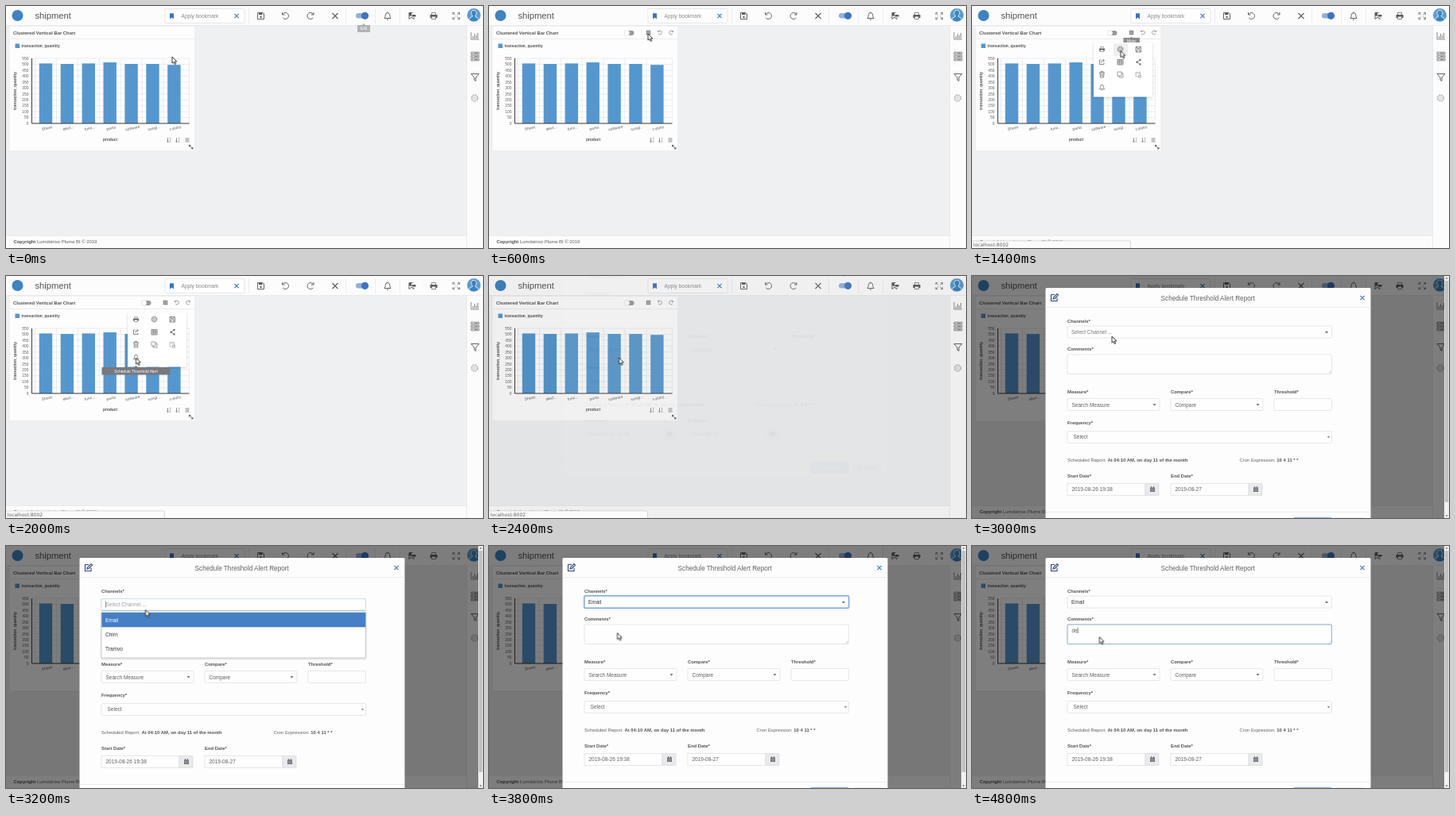
An HTML page for the animation above (5000 ms loop, 600 by 305 pixels).

```html
<!DOCTYPE html>
<html lang="en">
<head>
<meta charset="utf-8">
<title>Threshold alert scheduling</title>
<style>
html, body { margin: 0; width: 100%; height: 100%; overflow: hidden; background: #eff0f1; }
svg { display: block; width: 100%; height: 100%; font-family: "Liberation Sans", Arial, sans-serif; }
text { fill: #606060; font-size: 6.5px; }
.b { font-weight: bold; font-size: 5.9px; fill: #525252; }
.s { font-size: 4.9px; }
.note { font-size: 5.9px; }
.mid { text-anchor: middle; }
.end { text-anchor: end; }
.white { fill: #fff; }
.line { fill: none; stroke: #5c5c5c; stroke-width: .95; }
.thin { fill: none; stroke: #666; stroke-width: .75; }
.solid { fill: #5c5c5c; }
.field { fill: #fefefe; stroke: #dfe1e4; stroke-width: .8; }
.rule { fill: none; stroke: #e4e5e7; stroke-width: .7; }

/* One loop is 5 s, so 4% is 200 ms. */
.a { animation: 5s step-end infinite; }
.cursor { animation-name: cursor; }
.edit-tip { animation-name: edit-tip; }
.tools { animation-name: tools; }
.more-tip { animation-name: more-tip; }
.menu { animation-name: menu; }
.gear-hover { animation-name: gear-hover; }
.alert-tip { animation-name: alert-tip; }
.status { animation-name: status; }
.backdrop { animation-name: backdrop; }
.modal { animation-name: modal; }
.scrollbar { animation-name: scrollbar; }
.unset { animation-name: unset-value; }
.open { animation-name: open; }
.chosen { animation-name: chosen; }
.glow { animation-name: glow; }
.below { animation-name: below; }
.writing { animation-name: writing; }
.caret { animation-name: caret; }
.key1 { animation-name: key1; }
.key2 { animation-name: key2; }

@keyframes cursor {
  0% { transform: translate(209px, 64px); }
  4% { transform: translate(206px, 52px); }
  8% { transform: translate(203px, 43px); }
  12% { transform: translate(200px, 35px); }
  20% { transform: translate(200.5px, 34.5px); }
  28% { transform: translate(187px, 56.5px); }
  32% { transform: translate(182px, 98px); }
  36%, 48% { transform: translate(163.5px, 103px); }
  52% { transform: translate(180.5px, 92.5px); }
  56% { transform: translate(179px, 81px); }
  60% { transform: translate(176px, 76px); }
  64% { transform: translate(175.5px, 80.5px); }
  68% { transform: translate(174px, 86px); }
  72% { transform: translate(169px, 90px); }
  76% { transform: translate(161.5px, 109.5px); }
  80% { transform: translate(160.5px, 112px); }
  84%, 100% { transform: translate(160.2px, 114.5px); }
}
@keyframes edit-tip { 0% { opacity: 1; } 4%, 100% { opacity: 0; } }
@keyframes tools { 0% { opacity: 0; } 4%, 100% { opacity: 1; } }
@keyframes more-tip { 0% { opacity: 0; } 20% { opacity: 1; } 32%, 100% { opacity: 0; } }
@keyframes menu { 0% { opacity: 0; } 24% { opacity: 1; } 44%, 100% { opacity: 0; } }
@keyframes gear-hover { 0% { opacity: 0; } 28% { opacity: 1; } 32%, 100% { opacity: 0; } }
@keyframes alert-tip { 0% { opacity: 0; } 40% { opacity: 1; } 44%, 100% { opacity: 0; } }
@keyframes status { 0% { opacity: 0; } 24% { opacity: 1; } 60%, 100% { opacity: 0; } }
@keyframes backdrop { 0% { opacity: 0; } 48% { opacity: .05; } 52%, 100% { opacity: .5; } }
@keyframes modal {
  0% { opacity: 0; transform: translateY(-70px); }
  48% { opacity: .07; transform: translateY(-70px); }
  52% { opacity: 1; transform: translateY(-8px); }
  56%, 100% { opacity: 1; transform: none; }
}
@keyframes scrollbar { 0% { opacity: 0; } 52%, 100% { opacity: 1; } }
@keyframes unset-value { 0% { opacity: 1; } 64%, 100% { opacity: 0; } }
@keyframes open { 0% { opacity: 0; } 64% { opacity: 1; } 76%, 100% { opacity: 0; } }
@keyframes chosen { 0% { opacity: 0; } 76%, 100% { opacity: 1; } }
@keyframes glow { 0% { opacity: 0; } 76% { opacity: 1; } 80%, 100% { opacity: 0; } }
@keyframes below { 0% { transform: none; } 64% { transform: translateY(3px); } 76%, 100% { transform: none; } }
@keyframes writing { 0% { opacity: 0; } 80% { opacity: .7; } 84%, 100% { opacity: 1; } }
@keyframes caret {
  0% { opacity: 0; transform: none; }
  80% { opacity: 1; transform: none; }
  92% { opacity: 1; transform: translateX(3.7px); }
  96%, 100% { opacity: 1; transform: translateX(7.3px); }
}
@keyframes key1 { 0% { opacity: 0; } 92%, 100% { opacity: 1; } }
@keyframes key2 { 0% { opacity: 0; } 96%, 100% { opacity: 1; } }
</style>
</head>
<body>
<svg viewBox="0 0 600 305" preserveAspectRatio="none">
  <defs>
    <!-- Icons are centred on 0,0 -->
    <g id="print">
      <path class="solid" d="M-4.500-1.500h9v4h-2v-1.500h-5v1.500h-2z"/>
      <path class="thin" d="M-2.500-1.500v-2.500h5v2.500M-2.500 1.500v2.500h5v-2.500"/>
    </g>
    <g id="bell">
      <path class="line" d="M-4 3Q-2.700 1.500-2.700-1.200Q-2.500-4 0-4Q2.500-4 2.700-1.200Q2.700 1.500 4 3z"/>
      <path class="line" d="M-1 4.600h2M0-5v1"/>
    </g>
    <g id="gear">
      <circle class="line" r="4.300" stroke-dasharray="2.200 1.180"/>
      <circle class="thin" r="3.500"/><circle class="thin" r="1.500"/>
    </g>
    <g id="turn"><path class="line" d="M-3.600-1.800A4 4 0 1 1-3.300 2.300M-4-4.500v3h3"/></g>
    <path id="cross" d="M-3.500-3.500L3.500 3.500M3.500-3.500L-3.500 3.500"/>
    <g id="grid"><path class="solid" d="M-3.500-3.500h7v7h-7z"/><path d="M-1.200-3.500v7M1.200-3.500v7M-3.500-1.200h7M-3.500 1.200h7" stroke="#fff" stroke-width=".6"/></g>
    <g id="rack"><path class="thin" d="M-5-1.300h10v2.600h-10z" fill="#aaa"/><path class="thin" d="M-3.500 0h1M-1 0h4.500"/></g>
    <path id="caretdown" class="solid" d="M-2-1h4l-2 2.200z"/>
    <g id="date">
      <path d="M0-7.500h17v15H0z" fill="#e9eaed" stroke="#d8dade" stroke-width=".7"/>
      <path class="solid" d="M6-2.500h6v5.500h-6zM7-3.700h1v1h-1zM10-3.700h1v1h-1z"/>
      <path d="M6-1h6M6 1h6M8-1v4M10-1v4" stroke="#e9eaed" stroke-width=".4"/>
    </g>
    <g id="sort"><path class="thin" d="M-1.500-2.700v5.400M-2.700 1.500l1.200 1.300 1.200-1.300M.8-2.300h1.500M.8 0h1.500M.8 2.300h1.500"/></g>
    <filter id="soft" x="-10%" y="-10%" width="120%" height="120%"><feDropShadow dx="0" dy="1" stdDeviation="1.300" flood-opacity=".2"/></filter>
  </defs>

  <rect width="600" height="305" fill="#eff0f1"/>

  <!-- Chart card -->
  <rect x="5" y="26" width="232" height="156" fill="#fdfdfe"/>
  <path class="rule" d="M5 41.500h232"/>
  <text class="b" x="9" y="35.800">Clustered Vertical Bar Chart</text>
  <rect x="11.500" y="47.500" width="5.500" height="5.500" fill="#5497cf"/>
  <text class="b s" x="19.500" y="52">transaction_quantity</text>
  <g id="chart"></g>
  <text class="b s mid" transform="translate(13 107) rotate(-90)">transaction_quantity</text>
  <text class="b s mid" x="131" y="170">product</text>
  <use href="#sort" x="205" y="169"/><use href="#sort" x="216" y="169"/>
  <path class="thin" d="M225.500 167h5M225.500 169h5M225.500 171h5"/>
  <path class="thin" d="M230.500 175.500l4.500 4.500M230.500 177.500v-2h2M235 178v2h-2" style="stroke:#333"/>
  <g class="a tools">
    <path d="M174 31h5.500a3 3 0 0 1 0 6h-5.500z" fill="#96989b"/>
    <circle cx="173.500" cy="34" r="3.300" fill="#fff" stroke="#d5d5d5" stroke-width=".6"/>
    <use href="#grid" transform="translate(200.500 33.500) scale(.75)"/>
    <use href="#turn" transform="translate(215 33.500) scale(.6)"/>
    <use href="#turn" transform="translate(229 33.500) scale(-.6 .6)"/>
  </g>

  <!-- Footer and sidebar -->
  <path fill="#fcfcfd" d="M0 289.500h580V305H0z"/>
  <path class="rule" d="M0 289.500h580"/>
  <text class="note" x="9.500" y="298.800"><tspan class="b">Copyright</tspan> Lumdatrixo Plume BI © 2019</text>
  <path fill="#fcfcfd" d="M580 24h20v281h-20z"/>
  <path class="rule" d="M579.500 24v281"/>
  <path class="thin" d="M585 33v9h10M587.500 41v-3M589.500 41v-6M591.500 41v-4M593.500 41v-7"/>
  <use href="#rack" x="590" y="59.500"/><use href="#rack" x="590" y="63.500"/><use href="#rack" x="590" y="67.500"/>
  <path class="line" d="M585 85.500h10l-4 4.500v4.500l-2-1.500v-3z"/>
  <use href="#gear" x="589.500" y="116" opacity=".5"/>

  <!-- Toolbar -->
  <rect width="600" height="24.500" fill="#fcfcfd"/>
  <path class="rule" d="M0 24.500h600M305.500 3v19M427.500 3v19M464.500 3v19M495.500 3v19"/>
  <circle cx="14.500" cy="12" r="7" fill="#3f83c1"/>
  <text x="36.500" y="16" style="font-size:11.2px;fill:#505050">shipment</text>
  <rect class="field" x="200" y="3.500" width="100" height="18" rx="1.500"/>
  <path fill="#3d70bd" d="M206 9.200h5v7.300l-2.500-2-2.500 2z"/>
  <text x="220.600" y="15" style="fill:#888">Apply bookmark</text>
  <use href="#cross" transform="translate(290 12.500) scale(.75)" stroke="#4173bd" stroke-width="1.500"/>
  <path class="line" d="M316.500 8.500h6.500l1.500 1.500v6.500h-8z"/>
  <path class="solid" d="M318 8.500h4.500v2.500h-4.500z"/>
  <circle class="solid" cx="320.500" cy="14" r="1.200"/>
  <use href="#turn" x="351.500" y="12.500"/>
  <use href="#turn" transform="translate(383 12.500) scale(-1 1)"/>
  <use href="#cross" x="414" y="12.500" stroke="#5c5c5c" stroke-width="1.100"/>
  <rect x="440" y="9" width="15" height="6.500" rx="3.250" fill="#94b1db"/>
  <circle cx="451.500" cy="12.300" r="4.600" fill="#3d73c2"/>
  <use href="#bell" x="480" y="12.500"/>
  <path class="line" d="M511.500 8.500h-4.500v8l3-2.300 3 2.300v-2"/>
  <path class="solid" d="M510.500 11h5v2.500h-5zM507 8.500h3v4h-3z"/>
  <use href="#print" x="538" y="12.500"/>
  <path class="thin" d="M562 11v-2.500h2.500M568 8.500h2.500v2.500M570.500 14v2.500h-2.500M564.500 16.500h-2.500v-2.500M562 8.500l3 3M570.500 8.500l-3 3M570.500 16.500l-3-3M562 16.500l3-3"/>
  <circle cx="588.500" cy="11.500" r="8.500" fill="#5c9bd0"/>
  <path fill="#3d86c0" stroke="#eef4fa" stroke-width=".9" d="M582.300 17.300q1-3.300 4.200-3.800v-1.500a3.500 3.700 0 1 1 4 0v1.500q3.200.5 4.200 3.800a8.500 8.500 0 0 1-12.400 0z"/>

  <g class="a edit-tip">
    <path d="M442 24h6l2-2 2 2h6v9h-16z" fill="#b2b3b5"/>
    <text class="s mid white" x="450" y="30">Edit</text>
  </g>
  <g class="a more-tip">
    <path d="M190.500 40h8.500l1.500-1.500 1.500 1.500h9v8h-20.500z" fill="#8b8c8e"/>
    <text class="s mid white" x="200.500" y="46">More</text>
  </g>

  <!-- Card menu -->
  <g class="a menu">
    <path d="M153 46h74v68.500h-74z" fill="#fff" filter="url(#soft)"/>
    <rect class="a gear-hover" x="178" y="47" width="18" height="16" fill="#eeeff0"/>
    <use href="#print" transform="translate(163.500 54.500) scale(.75)"/>
    <use href="#gear" transform="translate(186.500 54.500) scale(.8)"/>
    <path class="thin" d="M206 51.500h6.500v6.500h-6.500zM207.500 51.500v2h3.500v-2M207.500 58v-3h3.500v3"/>
    <path class="thin" d="M162.500 68h-2v5.500h5.500v-2M162.500 71.500q.3-3 3.500-3M164.500 67l2 1.500-2 1.700"/>
    <path class="thin" d="M183 67.500h7v6.500h-7zM183 69.500h7M183 71.700h7M185.300 67.500v6.500M187.700 67.500v6.500"/>
    <path class="thin" d="M211.500 68l-4 2.700 4 2.700"/>
    <path class="solid" d="M210.500 67h2v2h-2zM206.500 69.700h2v2h-2zM210.500 72.500h2v2h-2z"/>
    <path class="thin" d="M160 84h7M162.300 84v-1.500h2.400v1.500M161 84l.4 6h4.200l.4-6M162.700 85.500v3M164.300 85.500v3"/>
    <path class="thin" opacity=".8" d="M183 83h5v5h-5zM185 88v2h5v-5h-2"/>
    <path class="thin" opacity=".5" d="M206 83.500h5.500v5.500h-5.500zM206 85.200h5.500M209.500 87.300h3.300v3h-3.300z"/>
    <use href="#bell" transform="translate(163.500 102.500) scale(.75)"/>
  </g>
  <g class="a alert-tip">
    <path d="M120.500 115h41l2-2 2 2h41v9.500h-86z" fill="#77797c"/>
    <text class="s mid white" x="163.500" y="121.500">Schedule Threshold Alert</text>
  </g>

  <rect class="a backdrop" width="600" height="305"/>

  <!-- Dialog -->
  <g class="a modal">
    <rect x="92.500" y="15" width="409" height="307" rx="1.500" fill="#fdfdfe"/>
    <path class="rule" d="M92.500 39.500h409"/>
    <path d="M104 23.500h-4.500v8h7.500v-4M102 29l.5-2 4.500-4.500 1.500 1.500-4.500 4.500z" fill="none" stroke="#30497c" stroke-width="1.100"/>
    <text class="mid" x="296.700" y="30.500" style="font-size:8.2px">Schedule Threshold Alert Report</text>
    <use href="#cross" transform="translate(491 27.500) scale(.75)" stroke="#4878c4" stroke-width="1.600"/>
    <text class="b" x="120" y="58.500">Channels*</text>
    <rect class="field" x="120" y="63" width="332.500" height="15" rx="1.500"/>
    <use href="#caretdown" x="446" y="71"/>
    <text class="a unset" x="125" y="73" style="fill:#777">Select Channel ...</text>
    <text class="a chosen" x="125" y="73" style="fill:#333">Email</text>
    <rect class="a glow" x="119.700" y="62.800" width="333" height="15.500" rx="1.500" fill="none" stroke="#7da5ea" stroke-width="1.500"/>

    <g class="a below">
      <text class="b" x="120" y="94.300">Comments*</text>
      <rect class="field" x="120" y="99" width="332.500" height="24.500" rx="1"/>
      <path class="thin" opacity=".5" d="M449 122.500l2.500-2.500M450.500 122.500l1-1"/>
      <rect class="a writing" x="120" y="99" width="332.500" height="24.500" rx="1" fill="none" stroke="#8fb5c9" stroke-width="1"/>
      <text class="a key1" x="125.500" y="109">d</text>
      <text class="a key2" x="129.100" y="109">e</text>
      <path class="a caret" d="M125.800 103v7" stroke="#333" stroke-width=".7"/>

      <text class="b" x="120" y="147.700">Measure*</text>
      <text class="b" x="250" y="147.700">Compare*</text>
      <text class="b" x="380" y="147.700">Threshold*</text>
      <rect class="field" x="120" y="154.500" width="116" height="15" rx="1.500"/>
      <rect class="field" x="250" y="154.500" width="116" height="15" rx="1.500"/>
      <rect class="field" x="380" y="154.500" width="72.500" height="15" rx="1.500"/>
      <text x="125.500" y="164.500">Search Measure</text><use href="#caretdown" x="229.500" y="162.300"/>
      <text x="255.500" y="164.500">Compare</text><use href="#caretdown" x="359.500" y="162.300"/>
      <text class="b" x="120" y="187.300">Frequency*</text>
      <rect class="field" x="120" y="195.500" width="332.500" height="15" rx="1.500"/>
      <text x="127.500" y="205">Select</text>
      <use href="#caretdown" transform="translate(448.500 203) scale(.8)"/>
      <text class="note" x="120" y="234">Scheduled Report: <tspan class="b">At 04:10 AM, on day 11 of the month</tspan></text>
      <text class="note" x="336.500" y="234">Cron Expression: <tspan class="b">10 4 11 * *</tspan></text>
      <text class="b" x="120" y="253.500">Start Date*</text>
      <text class="b" x="250" y="253.500">End Date*</text>
      <rect class="field" x="120" y="261.500" width="98" height="15"/>
      <rect class="field" x="250" y="261.500" width="98" height="15"/>
      <use href="#date" x="218" y="269"/><use href="#date" x="348" y="269"/>
      <text x="125.500" y="271.300">2019-08-26 19:38</text>
      <text x="255.500" y="271.300">2019-08-27</text>
      <path class="rule" d="M92.500 297.500h409"/>
      <rect x="404.500" y="304" width="48" height="15" rx="1.500" fill="#8fb2df"/>
      <path class="thin" d="M410 309h5v5h-5zM410 310.500h5" style="stroke:#fff"/>
      <text class="white" x="418.500" y="314">Schedule</text>
      <rect x="456.500" y="304" width="38" height="15" rx="1.500" fill="#eceef0"/>
      <circle class="thin" cx="465" cy="311.500" r="2.500"/><path class="thin" d="M463.300 313.200l3.400-3.400"/>
      <text x="470.500" y="314">Close</text>
    </g>

    <g class="a open">
      <rect x="120" y="66.500" width="332.500" height="15" rx="1.500" fill="#fefefe" stroke="#c5d3dc" stroke-width=".8"/>
      <path d="M119.500 62.500h333.500v3.500h-333.500z" fill="#fdfdfe"/>
      <path d="M120.500 81.300h331.500" stroke="#8cb8b8" stroke-width=".8"/>
      <path d="M125.500 70v7.500" stroke="#444" stroke-width=".6"/>
      <text x="125.500" y="76.300" style="fill:#a0a0a0">Select Channel ...</text>
      <rect x="120" y="83.500" width="332.500" height="57.500" fill="#fff" stroke="#bbb" stroke-width=".7" filter="url(#soft)"/>
      <rect x="120.300" y="84" width="332" height="18.300" fill="#4580c5"/>
      <text class="white" x="125" y="95.500">Email</text>
      <text x="125" y="113.800" style="fill:#333">Chirn</text>
      <text x="125" y="132" style="fill:#333">Tramvo</text>
    </g>
  </g>

  <g class="a scrollbar">
    <path fill="#f1f1f1" d="M594 0h6v305h-6z"/>
    <path fill="#c1c1c1" d="M594.700 6h4.600v279h-4.600z"/>
    <path fill="#666" d="M595.500 3.500h3l-1.500-2zM595.500 301.500h3l-1.500 2z"/>
  </g>
  <g class="a status">
    <path d="M-1 296h198.500q2 0 2 2v9H-1z" fill="#fbfbfb" stroke="#c8c8c8" stroke-width=".7"/>
    <text x="1.800" y="302.700" style="font:6px 'DejaVu Sans',sans-serif">localhost:8002</text>
  </g>
  <path class="a cursor" d="M0 0v8.200l1.900-1.700 1.400 3.100 1.400-.7-1.400-2.900h2.500z" fill="#fff" stroke="#222" stroke-width=".9"/>
</svg>
<script>
const products = ["Shoes", "elect...", "furni...", "pants", "software", "sungl...", "t-shirts"];
const quantities = [507, 503, 507, 516, 503, 503, 495];
const yOf = value => 148 - value * 82 / 550;
let marks = "";

for (let value = 0; value <= 550; value += 50) {
  const y = yOf(value);
  marks += `<path class="rule" d="M32.500 ${y}H230.500"/>
    <text class="s end" x="28.500" y="${y + 1.8}">${value}</text>`;
}
marks += '<path class="rule" d="M230.500 66v82"/>';

products.forEach((name, i) => {
  const x = 50 + i * 26.9;
  const top = yOf(quantities[i]);
  marks += `<path class="rule" d="M${x - 13.45} 66v82"/>
    <rect x="${x - 8.2}" y="${top}" width="16.400" height="${148 - top}" fill="#5497cf"/>
    <text class="s mid" transform="translate(${x + 2} 155.500) rotate(-13)">${name}</text>`;
});
marks += '<path class="line" d="M32.500 66v82h198" style="stroke:#333"/>';
document.getElementById("chart").innerHTML = marks;
</script>
</body>
</html>
```
